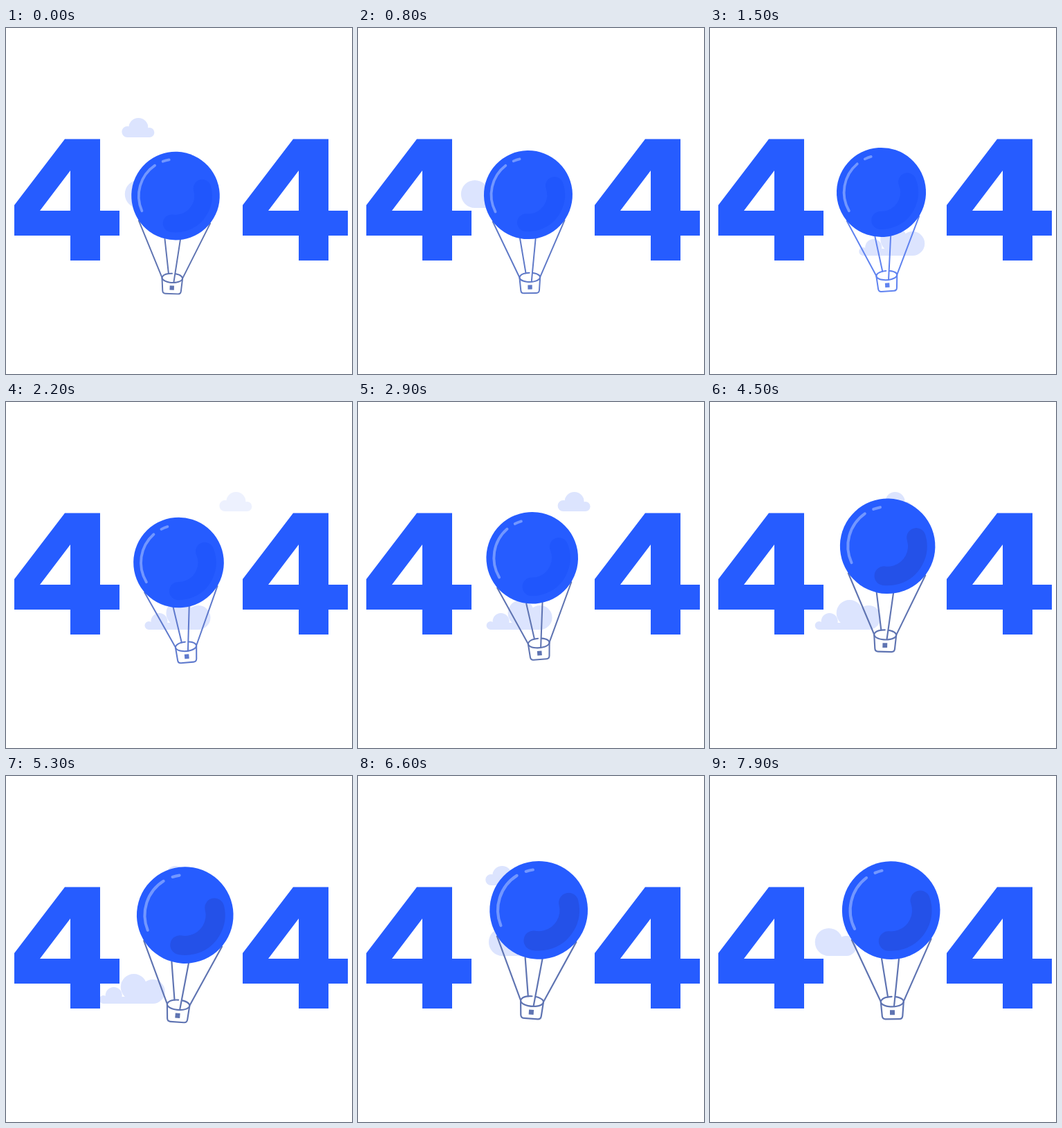
These frames come from a looping animation (500x500 px, 8000 ms). An HTML page with a canvas:

```html
<!DOCTYPE html>
<html lang="en">
<head>
<meta charset="utf-8">
<title>404</title>
<style>
html, body { margin: 0; width: 100%; height: 100%; overflow: hidden; background: #fff; }
canvas { display: block; width: 500px; height: 500px; }
</style>
</head>
<body>
<canvas id="stage" width="500" height="500"></canvas>
<script>
const ctx = document.getElementById('stage').getContext('2d');
const LOOP = 8000, STEP = 100, CYCLE = 7200;
const BLUE = '#265cff', CLOUD = '#dce4fe';
const TAU = Math.PI * 2, DEG = Math.PI / 180;

const clamp = v => Math.max(0, Math.min(1, v));
const ramp = (t, a, b) => clamp((t - a) / (b - a));
const mix = (a, b, k) => `rgb(${a.map((v, i) => Math.round(v + (b[i] - v) * k)).join()})`;

// Circles are [x, y, r], boxes are [x, y, w, h]; x counts from the cloud's left edge.
const clouds = [
  { start: 2000, x: 314, v: 0.0282,
    circles: [[8, 150, 8], [24, 144, 14], [40, 151, 7]],
    boxes: [[8, 148, 32, 10]] },
  { start: 900, x: 228, v: 0.0212,
    circles: [[6, 323, 6], [21, 317, 12], [50, 305, 19], [77.5, 311.5, 17.5]],
    boxes: [[6, 319, 72, 10], [50, 302, 28, 27]] },
  { start: 3100, x: 289, v: 0.0286,
    circles: [[20, 240, 20], [45.5, 245.5, 14.5]],
    boxes: [[20, 245, 25.5, 15]] }
];

function drawCloud(c, t) {
  const age = (t - c.start + 2 * CYCLE) % CYCLE;
  const alpha = ramp(age, 0, 400) * (1 - ramp(age, 5200, 5600));
  if (!alpha) return;
  ctx.save();
  ctx.globalAlpha = alpha;
  ctx.translate(c.x - c.v * age, 0);
  ctx.fillStyle = CLOUD;
  ctx.beginPath();
  for (const [x, y, r] of c.circles) {
    ctx.moveTo(x + r, y);
    ctx.arc(x, y, r, 0, TAU);
  }
  for (const b of c.boxes) ctx.rect(...b);
  ctx.fill();
  ctx.restore();
}

function polygon(points) {
  points.forEach(([x, y], i) => i ? ctx.lineTo(x, y) : ctx.moveTo(x, y));
  ctx.closePath();
}

function drawFour(x) {
  ctx.save();
  ctx.translate(x, 0);
  ctx.fillStyle = BLUE;
  ctx.beginPath();
  polygon([[0, 256], [73, 160.5], [124, 160.5], [124, 264], [152, 264], [152, 300],
    [124, 300], [124, 336], [81, 336], [81, 300], [0, 300]]);
  polygon([[81, 206], [81, 264], [37, 264]]);
  ctx.fill('evenodd');
  ctx.restore();
}

function line(x1, y1, x2, y2) {
  ctx.beginPath();
  ctx.moveTo(x1, y1);
  ctx.lineTo(x2, y2);
  ctx.stroke();
}

function arc(r, from, to, width, color) {
  ctx.lineWidth = width;
  ctx.strokeStyle = color;
  ctx.beginPath();
  ctx.arc(0, 0, r, from * DEG, to * DEG);
  ctx.stroke();
}

function drawBasket(color) {
  ctx.strokeStyle = ctx.fillStyle = color;
  ctx.lineWidth = 2.2;
  line(-57.5, 42, -17, 131);
  line(57.5, 42, 17, 131);
  line(-14.5, 70, -6.2, 125.5);
  line(10.5, 70, 2.6, 139);
  ctx.beginPath();
  ctx.ellipse(0, 132.3, 16.5, 7.3, 0, -72 * DEG, 268 * DEG);
  ctx.stroke();
  ctx.beginPath();
  ctx.moveTo(-16.5, 132.5);
  ctx.lineTo(-14.8, 153);
  ctx.quadraticCurveTo(-14.4, 157.5, -10, 157.5);
  ctx.lineTo(10, 157.5);
  ctx.quadraticCurveTo(14.4, 157.5, 14.8, 153);
  ctx.lineTo(16.5, 132.5);
  ctx.stroke();
  ctx.fillRect(-3.5, 144.5, 7, 7);
}

function drawBalloon(t) {
  const rise = (1 - Math.cos(TAU * t / CYCLE / 2)) / 2;
  const swing = 5 * Math.sin(TAU * (t - 540) / CYCLE);
  const ropeTint = ramp(t, 600, 1200) * (1 - ramp(t, 1800, 2500));
  const shade = ramp(t, 2900, 3700);

  ctx.save();
  ctx.translate(245.3 + 16.7 * rise + 0.13 * swing, 242.6 - 49.6 * rise);
  ctx.rotate(-swing * DEG);
  const scale = (63.8 + 7.2 * rise) / 71;
  ctx.scale(scale, scale);
  ctx.lineCap = ctx.lineJoin = 'round';

  drawBasket(mix([95, 116, 178], [96, 131, 240], ropeTint));
  ctx.fillStyle = BLUE;
  ctx.beginPath();
  ctx.arc(0, 0, 71, 0, TAU);
  ctx.fill();
  arc(44.6, -18.2, 95.5, 28.5, mix([32, 86, 252], [36, 81, 232], shade));
  arc(59.2, 153.8, 233.5, 4.2, '#7297ff');
  arc(59, 247.5, 257.7, 4.2, '#7297ff');
  ctx.restore();
}

function draw(t) {
  ctx.fillStyle = '#fff';
  ctx.fillRect(0, 0, 500, 500);
  clouds.forEach(c => drawCloud(c, t));
  drawFour(12);
  drawFour(342);
  drawBalloon(t);
}

let begin;
function tick(now) {
  begin ??= now;
  draw(Math.floor(((now - begin) % LOOP) / STEP) * STEP);
  requestAnimationFrame(tick);
}
draw(0);
requestAnimationFrame(tick);
</script>
</body>
</html>
```
